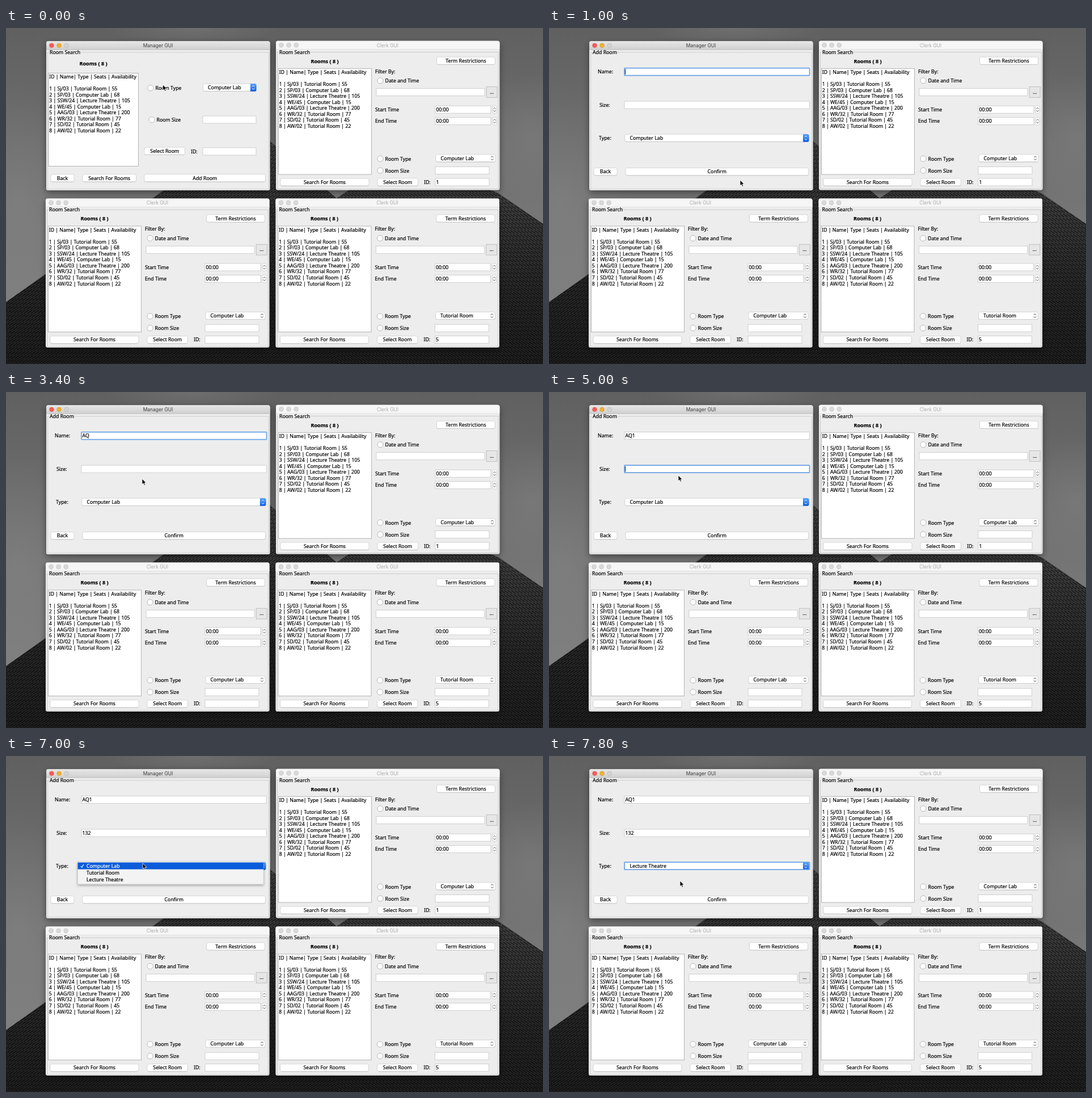
Recreate the animation shown at these times as an HTML page. Size 947x592 px, loop 8 s.

```html
<!DOCTYPE html>
<html lang="en">
<head>
<meta charset="utf-8">
<title>Room search</title>
<style>
  html, body { margin: 0; width: 100%; height: 100%; overflow: hidden; background: #6c6c6c; }
  svg { display: block; width: 100vw; height: 100vh; }
  text { font: 8.75px "Noto Sans", "Open Sans", sans-serif; fill: #000; stroke: #000; stroke-width: .2px; white-space: pre; }
  .mid { text-anchor: middle; }
  .bold { font-size: 9.1px; font-weight: 700; }
  .title { font: 8.45px Inter, Roboto, sans-serif; text-anchor: middle; stroke: none; }
  .list { font-size: 8.7px; }
  .hot { fill: #fff; stroke: #fff; }
</style>
</head>
<body>
<svg id="stage" viewBox="0 0 947 592" preserveAspectRatio="none"></svg>
<script>
const LOOP = 8000, STEP = 200;
const ROOMS = [
  'Sj/03 | Tutorial Room | 55', 'SP/03 | Computer Lab | 68',
  'SSW/24 | Lecture Theatre | 105', 'WE/45 | Computer Lab | 15',
  'AAG/03 | Lecture Theatre | 200', 'WR/32 | Tutorial Room | 77',
  'SD/02 | Tutorial Room | 45', 'AW/02 | Tutorial Room | 22'
];
const TYPES = ['Computer Lab', 'Tutorial Room', 'Lecture Theatre'];

const text = (x, y, s, cls = '', extra = '') =>
  `<text x="${x}" y="${y}" class="${cls}" ${extra}>${s}</text>`;
const rect = (x, y, w, h, fill, extra = '') =>
  `<rect x="${x}" y="${y}" width="${w}" height="${h}" fill="${fill}" ${extra}/>`;
const path = (d, stroke, width = 1) =>
  `<path d="${d}" fill="none" stroke="${stroke}" stroke-width="${width}" stroke-linecap="round" stroke-linejoin="round"/>`;
const group = (id, body) => `<g id="${id}">${body}</g>`;

const field = (x, y, w, s = '') =>
  rect(x, y, w, 13, '#fff', 'stroke="#c6c6c6" stroke-width=".8"') + text(x + 1.5, y + 9.8, s);

const plate = (x, y, w) =>
  rect(x, y + .7, w, 13, '#bdbdbd', 'rx="2.8"') +
  rect(x, y, w, 13, '#fff', 'rx="2.8" stroke="#cbcbcb" stroke-width=".7"');

const button = (x, y, w, s) => plate(x, y, w) + text(x + w / 2, y + 9.8, s, 'mid');

const radio = (x, y, s) =>
  `<circle cx="${x}" cy="${y}" r="5.1" fill="#fff" stroke="#a8a8a8" stroke-width=".8"/>` +
  text(x + 8.5, y + 3.6, s);

const arrows = (x, y, color) =>
  path(`M${x - 1.9} ${y - 1.5}l1.9 -2l1.9 2M${x - 1.9} ${y + 1.5}l1.9 2l1.9 -2`, color);

function combo(x, y, w, s, active, id = '') {
  const right = x + w;
  const cap = active
    ? `<path d="M${right - 10.5} ${y - .3}h7.7q2.8 0 2.8 2.8v8.2q0 2.8 -2.8 2.8h-7.7z" fill="url(#blue)"/>` +
      arrows(right - 5.3, y + 6.6, '#fff')
    : arrows(right - 5.5, y + 6.6, '#444');
  return plate(x, y, w) + text(x + 8.6, y + 10, s, '', id && `id="${id}"`) + cap;
}

function spinner(y) {
  return field(757, y, 98, '00:00') +
    rect(858, y - .3, 7.3, 13.8, '#fff', 'rx="3" stroke="#c0c0c0" stroke-width=".7"') +
    arrows(861.6, y + 6.6, '#555');
}

function roomList(x, y, w, h) {
  const rows = ROOMS.map((r, i) =>
    text(x + 1.2, y + 30.9 + i * 10.52, `${i + 1} | ${r}`, 'list'));
  return rect(x, y, w, h, '#fff', 'stroke="#a3a3a3" stroke-width=".8"') +
    text(x + 1.2, y + 9.8, 'ID | Name| Type | Seats | Availability', 'list') + rows.join('');
}

function frame(x, y, title, active) {
  const lights = active ? ['#fb5a52', '#f0b02f', '#d3d3d3'] : ['#d9d9d9', '#d9d9d9', '#d9d9d9'];
  const dots = lights.map((c, i) =>
    `<circle cx="${x + 9.5 + i * 13.1}" cy="${y + 7.5}" r="4" fill="${c}" stroke="#000" stroke-opacity=".15" stroke-width=".6"/>`);
  return rect(x, y, 394.5, 262.7, '#ededed', 'rx="3.5" filter="url(#shadow)"') +
    `<path d="M${x} ${y + 15}v-11.5q0 -3.5 3.5 -3.5h387.5q3.5 0 3.5 3.5v11.5z" fill="${active ? 'url(#bar)' : '#f6f6f6'}"/>` +
    path(`M${x} ${y + 15}h394.5`, active ? '#b5b5b5' : '#dcdcdc', .7) + dots.join('') +
    text(x + 197, y + 10.8, title, 'title', `style="fill:${active ? '#3c3c3c' : '#ababab'}"`) +
    rect(x + 2.5, y + 19.8, 390, 241, 'none', 'stroke="#c3c3c3" stroke-width=".8"');
}

const caption = (x, y, w, s) => rect(x - 1, y - 7, w, 9, '#ededed') + text(x, y, s);

function clerk(dx, dy, type, id) {
  return `<g transform="translate(${dx} ${dy})">` +
    frame(476, 22.7, 'Clerk GUI', false) + caption(482, 45.7, 56, 'Room Search') +
    text(562, 61.6, 'Rooms ( 8 )', 'mid bold') + button(759.5, 51.2, 103, 'Term Restrictions') +
    roomList(480.5, 71.3, 164, 186.7) +
    text(651, 79.8, 'Filter By:') + radio(660, 92.7, 'Date and Time') +
    field(653, 106.5, 191) +
    rect(847.2, 103.5, 19, 18.8, '#e6e6e6', 'stroke="#b5b5b5" stroke-width=".8"') +
    text(856.8, 115.5, '...', 'mid') +
    text(651, 146.9, 'Start Time') + spinner(137.2) +
    text(651, 167.4, 'End Time') + spinner(157.6) +
    radio(660, 230.2, 'Room Type') + combo(758, 222.7, 105, type, false) +
    radio(660, 251, 'Room Size') + field(757, 244.5, 95) +
    button(484, 265, 156, 'Search For Rooms') + button(655, 265, 71.5, 'Select Room') +
    text(737, 274.8, 'ID:') + field(757, 265, 95, id) + '</g>';
}

const searchView = () =>
  caption(77, 46.2, 56, 'Room Search') + text(154, 66, 'Rooms ( 8 )', 'mid bold') +
  roomList(75, 79.4, 158.5, 164) +
  radio(255, 105.7, 'Room Type') + combo(347.5, 98.2, 94, TYPES[0], true) +
  radio(257, 161.7, 'Room Size') + field(347, 155, 94) +
  button(244, 210.2, 71.5, 'Select Room') + text(326, 220.8, 'ID:') + field(347, 211, 94) +
  button(79, 257.7, 41, 'Back') + button(135, 257.7, 94.5, 'Search For Rooms') +
  button(244, 257.7, 213.5, 'Add Room') +
  group('pressed', rect(243.2, 257, 215.2, 14.4, 'url(#blue)', 'rx="3" stroke="#7fb0f0" stroke-width=".8"') +
    text(350.8, 267.5, 'Add Room', 'mid', 'opacity=".85"'));

const popup = () =>
  rect(126.5, 186.3, 327.5, 39.6, '#f3f3f3', 'filter="url(#soft)" stroke="#c4c4c4" stroke-width=".5"') +
  rect(126.5, 187.6, 327.5, 12, '#0b5cda', 'id="pick"') +
  TYPES.map((s, i) => text(142, 197 + i * 11.8, s, 'item')).join('') +
  `<path id="tick" d="M132 193.8l1.8 2.6l3.2 -5.6" fill="none" stroke-width="1.1"/>`;

const addView = () =>
  caption(77, 46.2, 44, 'Add Room') +
  text(86, 80.2, 'Name:') + field(133, 70.6, 326.5) +
  text(89, 138.8, 'Size:') + field(133, 129.1, 326.5) +
  text(88, 197.4, 'Type:') + combo(133.8, 187.2, 324.6, TYPES[0], true, 'kind') +
  rect(133, 70.6, 326.5, 13, 'none', 'id="ring" stroke="#6ba4e6" stroke-width="1.7" rx=".8"') +
  text(134.5, 80.3, '', '', 'id="name"') + text(134.5, 138.9, '', '', 'id="size"') +
  rect(134.2, 72.3, .9, 9.6, '#000', 'id="caret"') +
  button(79, 246.6, 41, 'Back') + button(135, 246.6, 322.5, 'Confirm') +
  group('popup', popup());

const brick = (id, skew) =>
  `<pattern id="${id}" width="11" height="8" patternUnits="userSpaceOnUse" patternTransform="skewY(${skew}) rotate(${skew / 3})">
    <path d="M0 1.5h8M5.5 5.5h5.5M0 5.5h2.5" stroke="#000" stroke-opacity=".5" stroke-width="2"/>
    <path d="M0 3.5h11M0 7.5h11" stroke="#fff" stroke-opacity=".07" stroke-width=".8"/></pattern>`;

const stops = list => list.map(([at, c]) => `<stop offset="${at}" stop-color="${c}"/>`).join('');
const grad = (id, list) =>
  `<linearGradient id="${id}" x1="0" y1="0" x2="0" y2="1">${stops(list)}</linearGradient>`;

const LEFT = 'M436 174L583 300V592H0V483Z';
const RIGHT = 'M583 300L700 222L870 292L947 345V592H583Z';

const backdrop = () =>
  `<defs>
    ${grad('sky', [[0, '#606060'], [.25, '#6a6a6a'], [.55, '#767676'], [.85, '#808080']])}
    ${grad('wall', [[0, '#4a4a4a'], [.3, '#343434'], [.65, '#222'], [1, '#191919']])}
    ${grad('bar', [[0, '#e7e7e7'], [1, '#cfcfcf']])}
    ${grad('blue', [[0, '#5ea6f8'], [.5, '#2f7cf0'], [1, '#1260e2']])}
    ${brick('brickL', -27)}${brick('brickR', 27)}
    <radialGradient id="cloud">${stops([[0, '#909090']])}<stop offset="1" stop-color="#909090" stop-opacity="0"/></radialGradient>
    <filter id="shadow" x="-10%" y="-10%" width="120%" height="125%"><feDropShadow dx="0" dy="4" stdDeviation="6" flood-opacity=".42"/></filter>
    <filter id="soft" x="-5%" y="-20%" width="110%" height="160%"><feDropShadow dx="0" dy="2" stdDeviation="2" flood-opacity=".35"/></filter>
  </defs>` +
  rect(0, 0, 947, 592, 'url(#sky)') +
  [[20, 300, 120, 190], [930, 190, 110, 110], [330, 0, 160, 30]].map(([x, y, rx, ry]) =>
    `<ellipse cx="${x}" cy="${y}" rx="${rx}" ry="${ry}" fill="url(#cloud)" opacity=".3"/>`).join('') +
  [[LEFT, 'brickL'], [RIGHT, 'brickR']].map(([d, p]) =>
    `<path d="${d}" fill="url(#wall)"/><path d="${d}" fill="url(#${p})"/>`).join('');

const pointer = () =>
  group('arrow', `<path d="M0 0V9.8L2.3 7.7L3.9 11.3L5.6 10.5L4.1 7H7.2Z" fill="#000" stroke="#fff" stroke-width=".8"/>`) +
  group('beam', path('M-1.7 -4.6Q0 -4.6 0 -3.6V3.6Q0 4.6 -1.7 4.6M1.7 -4.6Q0 -4.6 0 -3.6M0 3.6Q0 4.6 1.7 4.6M-1 1.4h2', '#111', .9));

document.getElementById('stage').innerHTML = backdrop() +
  clerk(0, 0, TYPES[0], '1') + clerk(-406, 277.7, TYPES[0], '') + clerk(-.5, 277.7, TYPES[1], '5') +
  frame(71, 23.2, 'Manager GUI', true) + group('search', searchView()) + group('add', addView()) + pointer();

const el = {};
document.querySelectorAll('#stage [id]').forEach(n => el[n.id] = n);
const items = [...document.querySelectorAll('.item')];
const show = (node, on) => node.style.display = on ? '' : 'none';
const move = (node, [x, y]) => node.setAttribute('transform', `translate(${x} ${y})`);

// Pointer stops: time, x, y
const TRACK = [
  [0, 276.5, 100], [200, 284, 122], [600, 337, 266], [1000, 337, 268], [1600, 242, 78],
  [2200, 242, 78], [2800, 240, 153], [4200, 240, 153], [4800, 228, 147],
  [5800, 228, 147], [6400, 241, 189], [7000, 241, 189], [7400, 232, 216], [7800, 231, 220]
];

function pointerAt(t) {
  const i = TRACK.findIndex(k => k[0] > t);
  if (i < 0) return TRACK[TRACK.length - 1].slice(1);
  const [t0, x0, y0] = TRACK[i - 1], [t1, x1, y1] = TRACK[i];
  const u = (t - t0) / (t1 - t0), e = u * u * (3 - 2 * u);
  return [x0 + (x1 - x0) * e, y0 + (y1 - y0) * e];
}

const typed = (s, times, t) => s.slice(0, times.filter(k => t >= k).length);

function render(now) {
  const t = Math.floor((now % LOOP) / STEP) * STEP;
  const adding = t >= 1000, open = t >= 6400 && t < 7600;
  const onSize = t >= 4600, onType = t >= 6400;
  show(el.search, !adding);
  show(el.add, adding);
  show(el.pressed, t >= 800);
  show(el.popup, open);

  el.name.textContent = typed('AQ1', [2600, 3000, 3800], t);
  el.size.textContent = typed('132', [5400, 5600, 5800], t);
  el.kind.textContent = TYPES[t >= 7600 ? 2 : 0];

  const pos = pointerAt(t);
  const beam = t >= 1600 && t < 2400;
  show(el.beam, beam);
  show(el.arrow, !beam);
  move(beam ? el.beam : el.arrow, pos);

  const lower = onSize ? 58.5 : 0;
  show(el.ring, adding && !open);
  el.ring.setAttribute('y', onType ? 187.2 : 70.6 + lower);
  const entry = onSize ? el.size : el.name;
  const width = entry.textContent && adding ? entry.getComputedTextLength() : 0;
  show(el.caret, !onType && (t + 200) % 1000 < 500);
  move(el.caret, [width, lower]);

  const pick = Math.max(0, Math.min(2, Math.floor((pos[1] - 187.6) / 11.8)));
  move(el.pick, [0, pick * 11.8]);
  items.forEach((n, i) => n.classList.toggle('hot', i === pick));
  el.tick.setAttribute('stroke', pick ? '#111' : '#fff');
}

const start = performance.now();
function tick() {
  render(performance.now() - start);
  requestAnimationFrame(tick);
}
tick();
</script>
</body>
</html>
```
